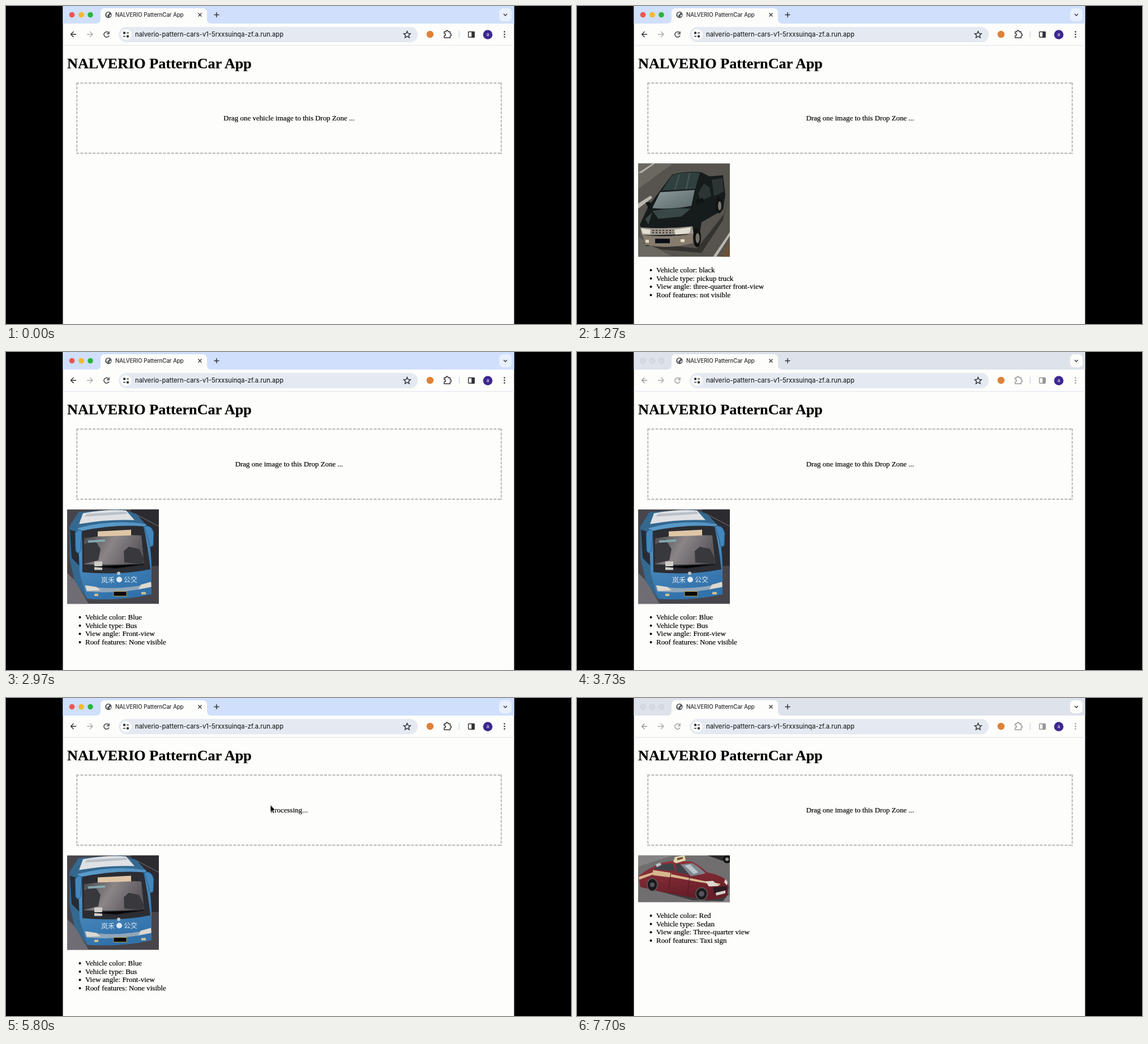
An HTML page that plays this animation: 998x561 px, repeating every 7.73 s.

```html
<!DOCTYPE html>
<html lang="en">
<head>
<meta charset="utf-8">
<title>NALVERIO PatternCar App</title>
<style>
  html, body { margin: 0; width: 100%; height: 100%; overflow: hidden; background: #000; }
  svg { display: block; width: 998px; height: 561px; }
  text { white-space: pre; }
  .page { font: 12.96px "Liberation Serif", serif; }
  .page text { stroke: #000; stroke-width: .2; }
  .page #results svg text { stroke: none; }
  .ui { font-family: Inter, sans-serif; fill: #1f2023; stroke: #1f2023; stroke-width: .12; }
  .line { fill: none; stroke: #303236; stroke-width: 1.4; }
  .strip { fill: #d0dffc; }
  .button { fill: #e8effd; }
  .blurred .strip { fill: #dde2eb; }
  .blurred .button { fill: #fdfdfb; }
  .blurred .control { opacity: .5; }
  .unlit circle { fill: #d6dae1; stroke: #c5c9d0; stroke-width: .7; }
</style>
</head>
<body>
<svg viewBox="0 0 998 561">
  <defs>
    <clipPath id="window"><path d="M100.500 0H897.500V561H100.500Z"/></clipPath>
    <linearGradient id="glass" x2="1" y2="1">
      <stop stop-color="#8d9b9c"/><stop offset="1" stop-color="#5c6869"/>
    </linearGradient>
    <linearGradient id="cabin" x2="1" y2=".3">
      <stop stop-color="#4b4a4e"/><stop offset=".5" stop-color="#8b8587"/><stop offset="1" stop-color="#5b585d"/>
    </linearGradient>
    <linearGradient id="blue" x2=".3" y2="1">
      <stop stop-color="#5f9fcd"/><stop offset="1" stop-color="#3272ab"/>
    </linearGradient>
    <linearGradient id="red" x2=".2" y2="1">
      <stop stop-color="#93343d"/><stop offset="1" stop-color="#651d27"/>
    </linearGradient>

    <svg id="pickup" width="162" height="165">
      <path fill="#57544f" d="M0 0H162V165H0Z"/>
      <path fill="#6b6862" d="M0 0H62L0 45ZM0 130L60 165H0Z"/>
      <path fill="#b9b6ae" d="M0 71L22 57 25 61 0 80ZM26 0H30L6 17H0ZM132 165L162 121V128L138 165Z"/>
      <path fill="#6a5138" d="M146 165L162 138V165Z"/>
      <path fill="#34332f" d="M8 140L104 150 153 88 158 58 150 100 112 158 40 152Z"/>
      <path fill="#161b1b" d="M60 20Q85 13 112 16L126 23 150 21 154 56 150 82 112 104 106 140 14 146 3 108 18 76Z"/>
      <path fill="#30403e" d="M60 21Q85 14 109 17L101 45 42 48Z"/>
      <path fill="#4c5c59" d="M72 20l2-1-8 27h-2zM90 18l2-1-6 28h-2z"/>
      <path fill="url(#glass)" d="M39 51L100 47 94 75Q60 82 25 79Z"/>
      <path fill="#2d3534" d="M106 53L116 36 126 42 129 58 110 67ZM130 29L149 26 151 50 134 58Z"/>
      <path fill="#394746" d="M25 84Q60 78 93 80L76 94 36 98ZM13 98L25 86 18 108Z"/>
      <path fill="#9c958b" d="M4 113Q50 117 96 111L98 125 7 127Z"/>
      <path fill="#e2ddd2" d="M5 115L22 117 21 125 8 124ZM64 117L93 113 91 123 66 126Z"/>
      <path stroke="#3c3934" stroke-width="2" stroke-dasharray="3 3" d="M25 118.500H62M25 122.500H62"/>
      <path fill="#867c6e" d="M8 127Q55 131 102 124L106 138Q60 153 13 144Z"/>
      <path fill="#0a0c14" d="M30 133H56V141H30Z"/>
      <path fill="#e6dcc2" d="M13 135h6v5h-6zM75 134h7v5h-7z"/>
      <ellipse cx="104" cy="131" rx="7" ry="17" fill="#111"/>
      <ellipse cx="105" cy="132" rx="3.500" ry="9" fill="#77756e"/>
      <ellipse cx="143" cy="74" rx="6" ry="14" fill="#111"/>
      <ellipse cx="144" cy="75" rx="3" ry="8" fill="#77756e"/>
      <path fill="#101414" d="M13 69l8-1 4 9-6 4zM101 65l13-4 3 7-13 4z"/>
    </svg>

    <svg id="bus" width="162" height="167">
      <path fill="#47454b" d="M0 0H162V167H0Z"/>
      <path fill="#6f6d73" d="M0 112L14 126 38 167H0Z"/>
      <path fill="#2c2b30" d="M112 0H162V100H146Z"/>
      <path stroke="#77757b" d="M120 8L162 30M0 145L16 167"/>
      <path fill="#34688f" d="M4 30L20 5 95 0 122 8 140 28 20 46 34 157 13 126 4 86Z"/>
      <path fill="#262c34" d="M5 36L18 40 22 100 8 86Z"/>
      <path fill="url(#blue)" d="M19 33Q80 17 139 26Q147 55 149 95L149 150Q95 162 35 158L22 112Z"/>
      <path fill="#dfe1e4" d="M28 7Q70 -1 104 2L119 19Q72 17 21 26Z"/>
      <path fill="#b9c0c8" d="M35 8L103 4 107 8 31 13Z"/>
      <path fill="#2b2d32" d="M26 38Q84 26 135 30Q142 62 147 106Q90 117 27 111Z"/>
      <path fill="url(#cabin)" d="M30 51Q80 44 131 46L136 95Q90 99 30 97Z"/>
      <path fill="#38383d" d="M30 62L48 53 59 70 55 90 30 96ZM100 74l9-8 18 4 8 16v10l-34-2z"/>
      <path fill="#dfc6a6" d="M54 39L113 36V46L54 48Z"/>
      <path fill="#81a9b0" d="M37 55L67 53V57L37 59Z"/>
      <path fill="#d0cdca" d="M48 92h14v15h-14z"/>
      <path stroke="#121418" stroke-width="1.500" d="M47 101L86 104 136 97"/>
      <circle cx="91" cy="113" r="3" fill="#c0c4c8"/>
      <path fill="#4287bd" stroke="#225780" d="M14 42Q20 32 26 39L24 72Q20 82 15 73ZM136 30Q149 26 153 42L152 64Q145 70 144 57Z"/>
      <g fill="#dfe9f0" font-family="'Noto Sans CJK SC','Noto Sans CJK',sans-serif" font-size="12">
        <text x="60" y="129">岚禾</text><text x="100" y="128">公交</text>
        <circle cx="92" cy="124" r="5"/>
      </g>
      <path fill="#8fa6b8" d="M31 135Q90 145 149 130V137Q92 150 34 145Z"/>
      <path fill="#ddd8cf" d="M32 134l20 3 7 6-24 1zM130 133l18-5v9l-22 4z"/>
      <path fill="#080708" stroke="#b5933e" d="M82 145H105V153H82Z"/>
      <path fill="#d9c291" d="M48 149h7v4h-7zM131 146h8v4h-8z"/>
    </svg>

    <svg id="taxi" width="162" height="83">
      <path fill="#706e6f" d="M0 0H162V83H0Z"/>
      <path fill="#858384" d="M0 0H62L0 20ZM120 83L162 70V83Z"/>
      <path fill="#29292c" d="M122 0H162V12L147 9Z"/>
      <circle cx="157" cy="7" r="7" fill="#111"/><circle cx="157" cy="7" r="3" fill="#999"/>
      <path fill="#3e3b3d" d="M5 55L95 79 150 81 160 68 145 60Z"/>
      <path fill="url(#red)" d="M1 37Q12 27 27 20 44 10 66 10L95 11Q112 20 121 30 147 35 156 44L160 56 157 71Q140 80 115 78L39 64 4 56Z"/>
      <path fill="#3d4349" d="M26 24Q42 14 61 14L65 28ZM66 15L73 15 91 34 69 30Z"/>
      <path fill="#7d878e" d="M75 16L96 14Q110 22 119 32L93 37Z"/>
      <path fill="#bdc3ca" d="M31 16l8-3 2 4-8 4zM82 18l10-2 14 14-8 3z"/>
      <path fill="#d6b88d" d="M26 26L59 31 57 39 26 35ZM57 33L115 45 145 50 144 53 112 48 57 38ZM1 38L26 30V34L2 43Z"/>
      <path fill="#e4d5ac" d="M65 3L82 0 84 9 67 14 62 11Z"/>
      <path fill="#6c4b36" d="M69 5l10-2v3l-10 3z"/>
      <path fill="#ddd8d0" d="M119 46l13-1 11 9-18 1zM154 42l4 5-1 6-5-5z"/>
      <path fill="#291b20" d="M132 57l24-3 1 7-23 6z"/>
      <path fill="#d4d0cb" d="M137 66l17-4v5l-16 4z"/>
      <path stroke="#4e1820" fill="none" d="M58 29L54 59M91 37L87 68"/>
      <g fill="#19181b" stroke="#5f5c5d" stroke-width="1.500">
        <ellipse cx="25" cy="52" rx="9" ry="11"/><ellipse cx="112" cy="68" rx="10" ry="11"/>
      </g>
      <g fill="#56535a"><circle cx="25" cy="52" r="4"/><circle cx="112" cy="68" r="5"/></g>
    </svg>
  </defs>

  <g id="app" clip-path="url(#window)">
    <path fill="#fdfdfb" d="M100 0H898V561H100Z"/>
    <path class="strip" d="M100 0H898V31H100Z"/>
    <path fill="#fdfdfb" d="M159 31Q167 31 167 23V12Q167 4 175 4H347Q355 4 355 12V23Q355 31 363 31Z"/>
    <path stroke="#dfe5f0" d="M100 69.500H898"/>
    <g id="lights">
      <circle cx="116.500" cy="15.500" r="4.800" fill="#f0544e"/>
      <circle cx="133" cy="15.500" r="4.800" fill="#f4b92c"/>
      <circle cx="149" cy="15.500" r="4.800" fill="#2bb53c"/>
    </g>
    <circle cx="181" cy="15.500" r="5.700" fill="#505357"/>
    <path fill="#eceef0" d="M177 14l3-3 3 1-2 3-2 1 1 3-2-1zM183 16l3-1-1 3-3 1z"/>
    <text class="ui" x="193" y="19" font-size="9.700">NALVERIO PatternCar App</text>
    <path class="line" d="M339.500 12.500l6 6m0-6l-6 6M367.500 15.500h9m-4.500-4.500v9"/>
    <rect class="button" x="871" y="4" width="22" height="23" rx="7"/>
    <path class="line" d="M879 14l3 3 3-3"/>

    <g class="line control">
      <path d="M124 50H115m4.500-5l-5 5 5 5M181 47A4.700 4.700 0 1 0 182 52M182 45v4h-4"/>
      <path d="M774 45.500h3q0-2.500 2-2.500t2 2.500h3.500v3.500q2 0 2 2t-2 2v3H774v-3.500q2.500 0 2.500-2T774 48.500Z"/>
      <rect x="816.700" y="45.500" width="10.500" height="9.500" rx="1"/>
      <path fill="#303236" d="M823 46h4v9h-4z"/>
    </g>
    <path class="line" stroke-opacity=".4" d="M143 50h9m-4-5l5 5-5 5"/>
    <rect x="199" y="37" width="528.500" height="27" rx="13.500" fill="#e5eaf2"/>
    <circle cx="212" cy="50.500" r="9.500" fill="#fdfdfb"/>
    <path class="line" d="M207 47.500h3m3 0h4M207 53.500h4m3 0h3"/>
    <g class="line"><circle cx="209" cy="47.500" r="1.500"/><circle cx="215" cy="53.500" r="1.500"/></g>
    <text class="ui" x="228" y="54.300" font-size="11.250">nalverio-pattern-cars-v1-5rxxsuinqa-zf.a.run.app</text>
    <path class="line" d="M708.500 44.500l1.700 3.900 4.300.4-3.200 2.800 1 4.200-3.800-2.200-3.800 2.200 1-4.200-3.200-2.800 4.300-.4z"/>
    <circle cx="749" cy="50" r="6.200" fill="#df8138"/>
    <path stroke="#cbd9f3" stroke-width="1.500" d="M800.500 44V56"/>
    <circle cx="851" cy="50.500" r="8.300" fill="#3d278f"/>
    <text x="851" y="53" text-anchor="middle" fill="#fff" font-family="Inter,sans-serif" font-size="8">a</text>
    <g class="control" fill="#303236">
      <circle cx="880.500" cy="45.500" r="1.300"/><circle cx="880.500" cy="50" r="1.300"/><circle cx="880.500" cy="54.500" r="1.300"/>
    </g>

    <g class="page">
      <text x="108" y="110" font-size="26.200" font-weight="bold">NALVERIO PatternCar App</text>
      <path fill="none" stroke="#c0c0c4" stroke-width="2.400" stroke-dasharray="4.900 2.400"
        d="M124 136H876M124 259.800H876M125.200 135V261M874.800 135V261"/>
      <text id="prompt" x="500" y="202" text-anchor="middle"></text>
      <g id="results"></g>
    </g>

    <g id="pointer">
      <g id="file">
        <rect x="-24" y="-12.500" width="49" height="28" opacity=".2"/>
        <rect x="-24.500" y="-14" width="49" height="28" fill="#fdfdfd" stroke="#bbb" stroke-width=".6"/>
        <use id="thumb"/>
        <path fill="#2b65d6" d="M-48 32H47Q49 32 49 34V43Q49 45 47 45H26V56Q26 58 24 58H-26Q-28 58-28 56V45H-48Q-50 45-50 43V34Q-50 32-48 32Z"/>
        <g fill="#fff" font-family="Inter,sans-serif" font-size="10" font-weight="600" text-anchor="middle">
          <text id="name1" y="42"></text><text id="name2" y="55"></text>
        </g>
        <circle cx="7" cy="17" r="7.500" fill="#35a532"/>
        <path stroke="#fff" stroke-width="2" d="M3 17h8m-4-4v8"/>
      </g>
      <path fill="#000" stroke="#fff" stroke-width=".9" d="M0-1V12L3 9.300 5.200 14 7.300 13 5.200 8.500H9Z"/>
    </g>
  </g>
</svg>
<script>
const LOOP = 7730;
const $ = id => document.getElementById(id);

// Each ride carries one file into the drop zone; times are in ms.
const rides = [
  { photo: 'pickup', height: 165, start: 130, drop: 400, done: 930, x: 430, y: 195,
    blur: [60, 440], file: ['0012_c001_00003', '210_0.jpg'],
    facts: ['black', 'pickup truck', 'three-quarter front-view', 'not visible'] },
  { photo: 'bus', height: 167, start: 1690, drop: 1950, done: 2800, x: 405, y: 199,
    blur: [1600, 2030], file: ['0025_c002_00005', '470_0.jpg'],
    facts: ['Blue', 'Bus', 'Front-view', 'None visible'] },
  { photo: 'taxi', height: 83, start: 3750, drop: 4140, done: 6000, x: 467, y: 189.5,
    blur: [3550, 3900], file: ['0038_c003_00008', '535_0.jpg'],
    facts: ['Red', 'Sedan', 'Three-quarter view', 'Taxi sign'] }
];
const labels = ['Vehicle color', 'Vehicle type', 'View angle', 'Roof features'];
const exit = { x: 930, y: 590 };

$('results').innerHTML = rides.map(({ photo, height, facts }) => `<g id="${photo}-result">
  <use href="#${photo}" x="108" y="277.500"/>${facts.map((fact, i) => {
    const y = 277.5 + height + 27.6 + i * 14.6;
    return `<circle cx="130.500" cy="${y - 4}" r="2"/><text x="140" y="${y}">${labels[i]}: ${fact}</text>`;
  }).join('')}</g>`).join('');

const show = (el, on) => el.style.display = on ? '' : 'none';
const within = (t, a, b) => t >= a && t < b;
const ease = p => 1 - (1 - p) ** 3;

function render(t) {
  const ride = rides.find(r => within(t, r.start, r.done + 150));
  const finished = rides.filter(r => t >= r.done).pop();
  const blurred = t >= 7600 || rides.some(r => within(t, ...r.blur));
  const dragging = ride && t < ride.drop;
  let prompt = finished ? 'Drag one image to this Drop Zone ...' : 'Drag one vehicle image to this Drop Zone ...';

  show($('pointer'), ride);
  show($('file'), dragging);
  if (ride) {
    const arrive = ease(Math.min(1, (t - ride.start) / (ride.drop - ride.start - 80)));
    const leave = Math.max(0, (t - ride.done) / 150) ** 2;
    const k = arrive - leave;
    const x = exit.x + (ride.x - exit.x) * k, y = exit.y + (ride.y - exit.y) * k;
    $('pointer').setAttribute('transform', `translate(${x} ${y})`);
    if (t < ride.done) {
      if (t >= ride.drop + 50) prompt = 'Processing...';
      else if (y < 261 && x < 876) prompt = 'Release to upload';
    }
    const scale = Math.min(44 / 162, 24 / ride.height);
    $('thumb').setAttribute('href', '#' + ride.photo);
    $('thumb').setAttribute('transform', `translate(${-81 * scale} ${-ride.height / 2 * scale}) scale(${scale})`);
    [$('name1').textContent, $('name2').textContent] = ride.file;
  }
  $('prompt').textContent = prompt;
  rides.forEach(r => show($(r.photo + '-result'), r === finished));
  $('app').classList.toggle('blurred', blurred);
  $('lights').classList.toggle('unlit', blurred && !ride);
}

function tick() {
  render(performance.now() % LOOP);
  requestAnimationFrame(tick);
}
tick();
</script>
</body>
</html>
```
